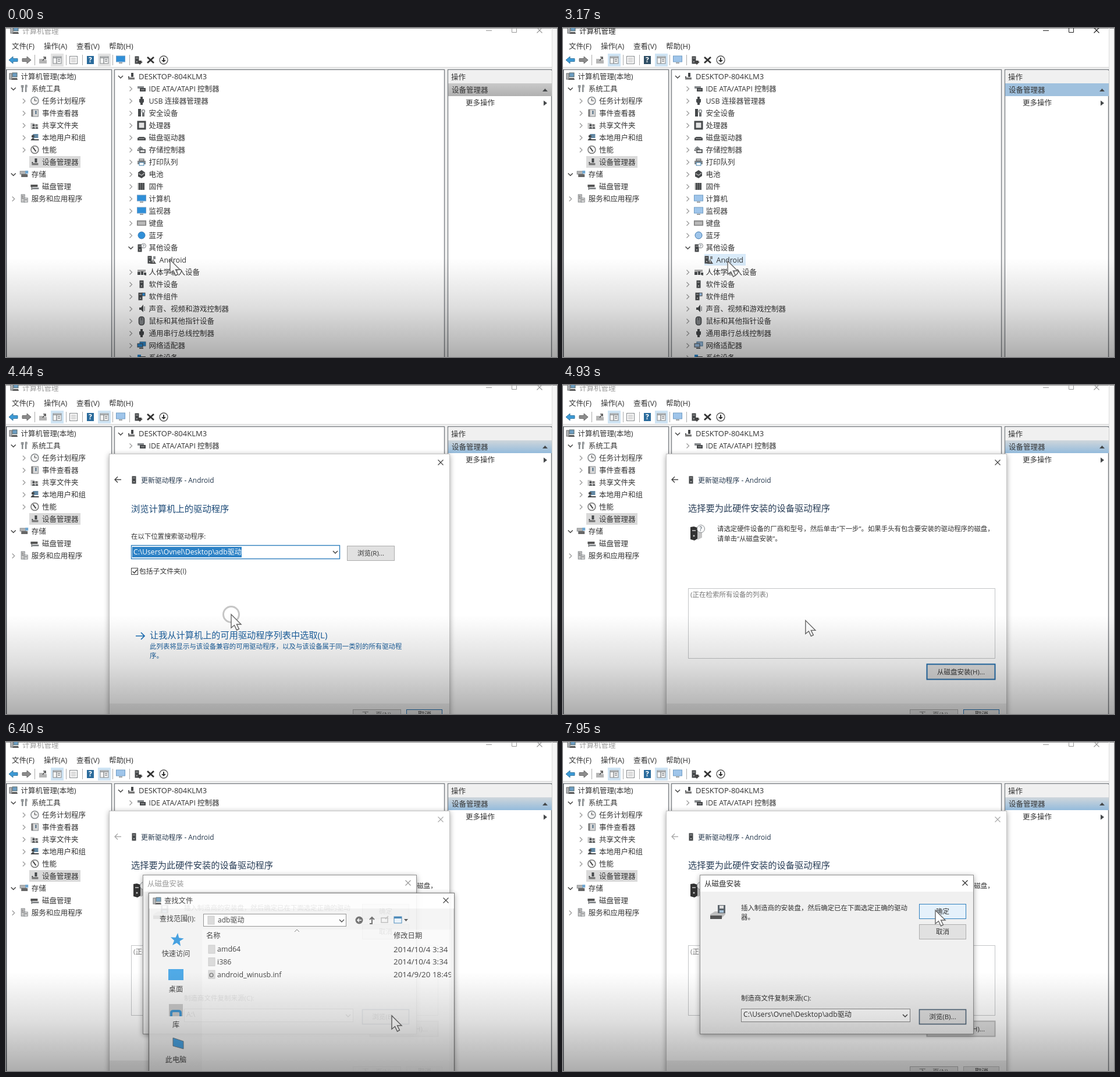
An HTML page that plays this animation: 947x565 px, repeating every 8000 ms.

```html
<!DOCTYPE html>
<html lang="zh-CN">
<head>
<meta charset="utf-8">
<title>设备管理器</title>
<style>
html, body { margin: 0; width: 100%; height: 100%; overflow: hidden; background: #fff; }
svg { display: block; width: 947px; height: 565px; }
text { font-family: "Open Sans", "Noto Sans CJK SC", "Noto Sans CJK", sans-serif; white-space: pre; }
.dialog { filter: drop-shadow(0 2px 5px rgba(0, 0, 0, .35)); }
</style>
</head>
<body>
<svg id="stage" viewBox="0 0 947 565" xmlns="http://www.w3.org/2000/svg"></svg>
<script>
const LOOP = 8000;
const INK = '#333', DARK = '#46494b', MID = '#85898c', BLUE = '#2f8fd8';
const PATH = 'C:\\Users\\Ovnel\\Desktop\\adb驱动';
const stage = document.getElementById('stage');

// Shape helpers; text is placed by its vertical centre.
const text = (x, y, s, size = 12.5, fill = INK, more = '') =>
  `<text x="${x}" y="${y + size * .36}" font-size="${size}" fill="${fill}" ${more}>${s}</text>`;
const rect = (x, y, w, h, fill, stroke = 'none', sw = 1, more = '') =>
  `<rect x="${x}" y="${y}" width="${w}" height="${h}" fill="${fill}" stroke="${stroke}" stroke-width="${sw}" ${more}/>`;
const fillPath = (d, fill = DARK) => `<path d="${d}" fill="${fill}"/>`;
const line = (d, stroke = DARK, sw = 1.2) => `<path d="${d}" fill="none" stroke="${stroke}" stroke-width="${sw}"/>`;
const disc = (x, y, r, fill, stroke = 'none', sw = 1) =>
  `<circle cx="${x}" cy="${y}" r="${r}" fill="${fill}" stroke="${stroke}" stroke-width="${sw}"/>`;
const at = (x, y, body) => `<g transform="translate(${x} ${y})">${body}</g>`;
const group = (id, body, cls = '') => `<g id="${id}" class="${cls}">${body}</g>`;
const cross = (x, y, stroke, r = 4.5) => line(`M${x - r} ${y - r}l${2 * r} ${2 * r}m0 ${-2 * r}l${-2 * r} ${2 * r}`, stroke, 1.2);
const chevron = (x, y, open) => open
  ? line(`M${x - 4} ${y - 2}l4 4 4-4`, '#444', 1.5)
  : line(`M${x - 2} ${y - 4}l4 4-4 4`, '#9a9a9a', 1.3);
const button = (x, y, w, h, label, edge = '#adadad', sw = 1, fill = '#e1e1e1', ink = INK) =>
  rect(x + .5, y + .5, w - 1, h - 1, fill, edge, sw) +
  text(x + w / 2, y + h / 2, label, 11.5, ink, 'text-anchor="middle"');

const tower = rect(-3.5, -6.5, 7, 13, DARK) + rect(-2, -4, 4, 1.2, '#aaa') + disc(0, 3, 1.1, '#ccc');
const screen = rect(-7.5, -6, 15, 10, 'var(--screen)', '#6f9bc4') + line('M-3 6h6', MID, 1.6);
const machine = rect(-2, -6, 8, 7, '#6c9dc2', '#566') + rect(-7, -5, 4, 10, '#b5b9bc', '#666') + fillPath('M-2 3h8l1 3h-11z', '#555');
const icons = {
  machine, tower, screen,
  ide: rect(-7, -4, 11, 4, MID) + rect(-3, -1, 10, 6, DARK) + line('M-1 2h6', '#aaa'),
  usb: fillPath('M-2-7h4v4h2v5l-2 2v3h-4v-3l-2-2v-5h2z'),
  lock: rect(-6, -7, 5, 13, DARK) + line('M2 6v-7m2 7v-7', DARK, 1.6) + disc(3, -3, 2.4, 'none', MID, 1.5),
  cpu: rect(-6, -6, 12, 12, '#e2e2e2', DARK, 3),
  disk: fillPath('M-7 1l3-2h8l3 2v4h-14z') + line('M-5 2h10', '#aaa'),
  store: fillPath('M-7-2l5-4 5 4-5 4z', MID) + rect(-3, 0, 9, 5, '#ddd', DARK, 1.6) + line('M-5 2l-2-2', DARK, 2),
  printer: rect(-7, -2, 14, 6, MID) + rect(-4, -5, 8, 3, '#ddd', DARK) + rect(-4, 1, 8, 5, '#fff', '#3a7cab'),
  battery: fillPath('M-6-3l6-4 6 4v6l-6 4-6-3z') + line('M-5-1l5 3 5-4', '#bbb', 1.4),
  firmware: rect(-5, -6, 10, 12, DARK) + line('M-6-6v12m4-12v12m4-12v12', '#8a8a8a', 1),
  keyboard: rect(-7.5, -4, 15, 8, '#9b9b9b', '#777') + line('M-6-1h12m-12 2.5h12', '#e4e4e4'),
  wireless: disc(0, 0, 6, 'var(--screen)', '#3d79b0'),
  unknown: at(-3, 1, tower) + disc(3.5, -3, 4, '#f4f4f4', MID) + text(1.8, -3, '?', 7, '#345'),
  warn: at(-4, 0, tower) + fillPath('M2-6h4v5h-4z', MID) + fillPath('M2-1l5 8h-10z', '#555') + line('M2 1v4', '#fff', 1),
  hid: rect(-7, -4, 14, 4, '#aaa') + fillPath('M-7 5v-5h5v5zM-1 5v-6h4v6zM4 5v-4h4v5z'),
  component: at(-2, 0, tower) + rect(1, -6, 5, 5, 'var(--screen)', DARK),
  sound: fillPath('M-4-2h3l4-5v13l-4-4h-3z') + line('M5-4v8', MID, 1.4),
  mouse: rect(-4.5, -7, 9, 14, MID, DARK, 1.6, 'rx="4"') + line('M0-6v5', DARK),
  net: rect(-3, -6, 10, 7, 'var(--screen)', '#4b7899') + rect(-7, -3, 9, 6, 'var(--screen)', DARK) + line('M-4 5h7', DARK, 1.6),
  system: rect(-7, -5, 6, 4, BLUE) + rect(-4, -2, 11, 6, DARK),
  tools: line('M-3-6v12m6-12v12', MID, 2.4) + line('M-5-6v4h4v-4m3 0h3v4', MID, 1),
  clock: disc(0, 0, 6.5, '#f4f4f4', MID, 1.5) + line('M0-4v4h4', '#555'),
  log: rect(-5, -6, 11, 12, '#d9d9d9', MID) + rect(-6, -6, 3, 12, '#777') + line('M2-4v6', '#4a6880', 2),
  shared: fillPath('M-7-4h6l1 2h6v8h-13z', '#c8c8c8') + disc(-2, 0, 2, DARK) + disc(3, 0, 2, '#777') + fillPath('M-5 6q3-6 6 0zM1 6q3-6 5 0z'),
  users: rect(-3, -6, 9, 7, '#6288a4') + disc(-3, -2, 2.5, DARK) + fillPath('M-7 5q4-8 8 0z') + line('M0 4h7', DARK, 2),
  gauge: disc(0, 0, 6.5, '#f4f4f4', '#777', 1.5) + line('M-3-4l5 7', '#444', 2),
  devices: rect(0, -6, 4, 7, DARK) + rect(-5, 2, 11, 3.5, '#777') + line('M-4 0v2', DARK, 2),
  storage: rect(-7, -5, 10, 5, '#b5b5b5', MID) + rect(-5, 0, 11, 5, '#666') + rect(2, -6, 5, 5, '#71a8d2'),
  drives: rect(-7, -3, 12, 4, '#555') + rect(-4, 2, 11, 3, MID) + line('M-5 0v6', DARK),
  services: rect(-5, -7, 6, 13, '#c9c9c9', MID) + rect(0, -1, 6, 7, '#ddd', MID) + line('M-4-4h3m-3 3h3m2 3h4', '#555'),
};
const icon = (name, x, y) => at(x, y, icons[name]);
// state: 0 leaf, 1 closed, 2 open
const row = (x, y, name, label, state) =>
  (state ? chevron(x - 18.5, y + .5, state === 2) : '') + icon(name, x, y) + text(x + 12.5, y, label);

const devices = [
  ['ide', 'IDE ATA/ATAPI 控制器'], ['usb', 'USB 连接器管理器'], ['lock', '安全设备'], ['cpu', '处理器'],
  ['disk', '磁盘驱动器'], ['store', '存储控制器'], ['printer', '打印队列'], ['battery', '电池'],
  ['firmware', '固件'], ['screen', '计算机'], ['screen', '监视器'], ['keyboard', '键盘'],
  ['wireless', '蓝牙'], ['unknown', '其他设备', 2], ['warn', 'Android', 0], ['hid', '人体学输入设备'],
  ['tower', '软件设备'], ['component', '软件组件'], ['sound', '声音、视频和游戏控制器'],
  ['mouse', '鼠标和其他指针设备'], ['usb', '通用串行总线控制器'], ['net', '网络适配器'], ['system', '系统设备'],
];
// [depth, icon, label, state]
const places = [
  [0, 'machine', '计算机管理(本地)', 0], [1, 'tools', '系统工具', 2], [2, 'clock', '任务计划程序', 1],
  [2, 'log', '事件查看器', 1], [2, 'shared', '共享文件夹', 1], [2, 'users', '本地用户和组', 1],
  [2, 'gauge', '性能', 1], [2, 'devices', '设备管理器', 0], [1, 'storage', '存储', 2],
  [2, 'drives', '磁盘管理', 0], [1, 'services', '服务和应用程序', 1],
];

function toolbar() {
  const arrow = 'M-8 0l7-6v3.5h8v5h-8v3.5z';
  const sheet = rect(-7, -6, 14, 12, '#f5f5f5', MID) + line('M-7-4h14m-8 0v10M1-1h4m-4 3h4', MID, 1.4);
  return at(13, 55, `<path d="${arrow}" fill="#3d9ad6" stroke="#34779f"/>`) +
    at(35, 55, `<path d="${arrow}" fill="#8d8d8d" stroke="#666" transform="scale(-1 1)"/>`) +
    [49, 103, 131, 183, 212].map(x => line(`M${x}.5 46v18`, '#aaa', 1)).join('') +
    [77, 158].map(x => rect(x, 44, 22, 22, 'var(--tool)')).join('') +
    at(64, 55, fillPath('M-7-2h6l1 2h6v6h-13z', '#b5b5b5') + line('M-1 1l5-6m-4 0h4v4', '#555', 1.6)) +
    at(88, 55, sheet) + at(169, 55, sheet) +
    at(116, 55, rect(-6.5, -6.5, 13, 13, '#f8f8f8', MID) + line('M-4-3h8m-8 3h8m-8 3h8', '#aaa')) +
    at(145, 55, rect(-6, -7, 12, 14, 'var(--help)') + text(-3, 0, '?', 12, '#fff', 'font-weight="700"')) +
    at(197, 54, screen) +
    at(227, 55, at(-2, 0, tower) + fillPath('M0 1h6v2h2l-5 5-5-5h2z', '#444')) +
    line('M243 50l11 10m0-10l-11 10', '#333', 2.8) +
    disc(271, 55, 7, '#fff', '#555', 1.3) + fillPath('M270 51h2v4h3l-4 4-4-4h3z', '#333');
}

function mainWindow() {
  const frame = (x, w) => rect(x + .5, 71.5, w, 510, '#fff', '#777c81', 1.3);
  return rect(0, 0, 947, 565, '#fff') + rect(938, 0, 9, 565, '#f5f5f5') + rect(0, 67, 938, 498, '#f0f0f0') +
    line('M0 .5h947', '#8a8a8a', 1) + line('M0 67.5h938', '#d5d5d5', 1) + line('M938.5 0v565', '#ddd', 1) +
    icon('machine', 15, 4) + text(28, 5, '计算机管理', 12.5, 'var(--title)') +
    line('M825 4.5h10M869.5 -.5h8v8h-8z', 'var(--title)', 1) + cross(917, 4, 'var(--title)') +
    ['文件(F)', '操作(A)', '查看(V)', '帮助(H)'].map((s, i) => text([10, 65, 121, 177][i], 31, s)).join('') +
    toolbar() + frame(0, 181) + frame(186, 567) + frame(759, 178) +
    line('M.5 72v493', '#454a50', 1.5) +
    rect(40, 220, 88, 20, '#d9d9d9') +
    places.map(([d, name, label, state], i) => row(13 + 18.2 * d, 83 + 21 * i, name, label, state)).join('') +
    group('hover', rect(243, 388, 71, 20, '#d8eaf9')) +
    chevron(197, 84, true) + icon('devices', 215, 83) + text(228, 83, 'DESKTOP-804KLM3', 13) +
    devices.map(([name, label, state = 1], i) => row(state ? 233 : 251, 104 + 21 * i, name, label, state)).join('') +
    rect(760, 73, 178, 22, '#f0f0f0') + text(765, 84.5, '操作') +
    rect(760, 95, 178, 22, 'var(--bar)') + text(766, 106, '设备管理器') +
    fillPath('M922 109l4.5-5 4.5 5z') + text(790, 128.5, '更多操作') + fillPath('M924 124.5l6 4.5-6 4.5z');
}

function wizard() {
  const browse = text(215, 212, '浏览计算机上的驱动程序', 15.3, '#1d4b78') +
    text(215, 260, '在以下位置搜索驱动程序:', 11.4) +
    rect(215.5, 275.5, 358, 23, '#fff', '#2f7fbd', 1.4) + rect(217, 278, 188, 18, '#2d82c6') +
    text(219, 287, PATH, 12.1, '#fff') + chevron(566, 287, true) +
    button(586, 276, 82, 26, '浏览(R)...') +
    rect(215.5, 314.5, 11, 11, '#fff', '#444') + line('M217.5 320l3 3 5-6', '#333', 1.4) +
    text(229, 320, '包括子文件夹(I)', 11.8) +
    line('M223 431h15m-6-6l6 6-6 6', '#1c70b8', 1.7) +
    text(247, 430, '让我从计算机上的可用驱动程序列表中选取(L)', 15.2, '#1b609f') +
    text(247, 449, '此列表将显示与该设备兼容的可用驱动程序，以及与该设备属于同一类别的所有驱动程', 11.42, '#1b609f') +
    text(247, 465, '序。', 11.42, '#1b609f');
  const choose = text(215, 212, '选择要为此硬件安装的设备驱动程序', 15.25, '#2a3f58') +
    at(231, 253, fillPath('M-12-9l6-1 6 2v19l-5 3-7-2z', '#333') + fillPath('M0-8l8 2v15l-8 4z', '#c4c4c4') +
      rect(-9, -4, 6, 2, '#aaa') + disc(-6, 6, 1.5, '#ccc') +
      disc(6, -6, 6.5, '#fafafa', MID) + text(3.5, -6, '?', 10, '#345')) +
    text(265, 247, '请选定硬件设备的厂商和型号，然后单击“下一步”。如果手头有包含要安装的驱动程序的磁盘，', 11.42) +
    text(265, 263.5, '请单击“从磁盘安装”。', 11.42) +
    rect(215.5, 349.5, 527, 120, '#fff', '#c3c5c7') + text(219, 360, '(正在检索所有设备的列表)', 11.5, '#777') +
    button(625, 479, 118, 27, '从磁盘安装(H)...', 'var(--edge)', 2);
  return rect(177.5, 118.5, 585, 470, '#fff', '#c4c4c4') + rect(178, 547, 584, 20, '#f0f0f0') +
    cross(747, 133, 'var(--wizard)') + line('M198 162.5h-11m5-5l-5 5 5 5', 'var(--wizard)', 1.4) +
    at(220, 163, tower) + text(232, 163.5, '更新驱动程序 - Android', 11.9, '#25384d') +
    group('browse', browse) + group('choose', choose) +
    button(596, 557, 83, 26, '') + text(612, 566, '下一页(N)', 11.5, '#777') +
    button(688, 557, 62, 26, '', 'var(--edge)') + text(708, 566, '取消', 11.5);
}

function diskDialog() {
  return rect(235.5, 228.5, 470, 273, '#f0f0f0', '#8f8f8f') + rect(236, 229, 469, 28, '#fff') +
    text(243, 243, '从磁盘安装', 12.5, 'var(--disk)') + cross(691, 242, 'var(--disk)') +
    at(266, 292, fillPath('M-13 4l8-5h18v5l-6 6h-20z', '#bdbdbd') + fillPath('M-13 6h20v6h-20z', '#555') +
      rect(0, -12, 13, 14, '#5d666d') + rect(3, -11, 7, 5, '#ddd') + rect(3, -3, 7, 4, '#a9c4da')) +
    text(306, 285, '插入制造商的安装盘，然后确定已在下面选定正确的驱动', 11.45) + text(306, 301, '器。', 11.45) +
    button(612, 278, 81, 26, '确定', 'var(--ok)', 1, 'var(--okFill)') + button(612, 313, 81, 26, '取消') +
    text(306, 440, '制造商文件复制来源(C):', 11.5) +
    rect(306.5, 458.5, 290, 22, '#fff', '#8a8a8a') + chevron(588, 470, true) +
    group('drive', text(310, 468, 'A:\\', 12.1)) + group('source', text(310, 468, PATH, 12.1)) +
    button(612, 459, 81, 26, '浏览(B)...', '#50667a', 1.6);
}

function picker() {
  const folder = (x, y) => rect(x - 5, y - 7, 11, 14, '#d9d9d9', '#c8c8c8');
  const star = Array.from({ length: 10 }, (_, i) => {
    const r = i % 2 ? 5 : 12, a = i * Math.PI / 5 - Math.PI / 2 + .1;
    return `${(294 + r * Math.cos(a)).toFixed(1)} ${(340 + r * Math.sin(a)).toFixed(1)}`;
  }).join('L');
  const files = [['amd64', '2014/10/4 3:34'], ['i386', '2014/10/4 3:34'], ['android_winusb.inf', '2014/9/20 18:49']];
  return '<clipPath id="list"><rect x="337" y="322" width="428" height="250"/></clipPath>' +
    rect(245.5, 259.5, 525, 330, '#f4f4f4', '#777', 1.4) + rect(246, 260, 524, 26, '#fff') +
    icon('machine', 260, 273) + text(272, 273, '查找文件', 12.3) + cross(756, 272, '#333') +
    text(264, 304, '查找范围(I):', 12) +
    rect(339.5, 295.5, 245, 21, '#fff', '#8a8a8a') + folder(352, 306) + text(364, 306, 'adb驱动', 12) + chevron(577, 307, true) +
    disc(607, 306, 6.5, '#666') + line('M611 306h-7m3-3l-3 3 3 3', '#fff', 1.4) +
    line('M625 312h4v-11m-4 4l4-4 4 4', '#666', 2) + line('M645 302h11v8h-11zm7 2l5-5', '#bbb', 1.5) +
    rect(667, 300, 13, 11, '#eaf4fc', '#3b80b5') + rect(667, 300, 13, 3, '#3b80b5') + fillPath('M684 304h7l-3.5 4z') +
    rect(337, 322, 428, 250, '#fafafa') + line('M496 326l4-4 4 4', '#777', 1) +
    `<g clip-path="url(#list)">` + text(344, 333, '名称', 12.3) + text(666, 333, '修改日期', 12.3) +
    files.map(([name, date], i) => {
      const y = 356 + 21.6 * i;
      return folder(353, y) + (i === 2 ? disc(353, y + 1, 3, 'none', '#777', 1.6) : '') +
        text(363, y, name, 12.4) + text(666, y, date, 13.4);
    }).join('') + '</g>' +
    fillPath(`M${star}z`, '#3398df') + rect(279, 390, 26, 19, '#3da2e6') +
    rect(280, 450, 24, 21, '#c4c4c4') + line('M284 471v-6q0-3 4-3h8q4 0 4 3v6', '#2f8ccb', 4) +
    fillPath('M287 508l18 6v13l-18-5z', '#3398df') + line('M287 508l18 6v13l-18-5z', '#65727c', 1) +
    ['快速访问', '桌面', '库', '此电脑'].map((s, i) => text(292, 364 + 60.6 * i, s, 12.2, INK, 'text-anchor="middle"')).join('');
}

const shade = (id, stops) => `<linearGradient id="${id}" x2="0" y2="1">` +
  stops.map((s, i) => `<stop offset="${i / (stops.length - 1)}" ${s}/>`).join('') + '</linearGradient>';

stage.innerHTML = '<defs>' +
  shade('idle', ['stop-color="#c9c9c9"', 'stop-color="#b0b0b0"']) +
  shade('mixed', ['stop-color="#cfd6db"', 'stop-color="#94bbdc"']) +
  shade('dusk', ['stop-opacity="0"', 'stop-opacity=".13"', 'stop-opacity=".32"']) + '</defs>' +
  mainWindow() + group('wizard', wizard(), 'dialog') + group('disk', diskDialog(), 'dialog') +
  group('picker', picker(), 'dialog') +
  group('ring', disc(387, 394, 13.5, 'none', '#c6c6c6', 3)) +
  group('cursor', '<path d="M0 0V23L5.5 18.5 9.5 27 13.5 25 9.5 17H17Z" fill="#fff" stroke="#666" stroke-width="1.4"/>') +
  rect(0, 395, 947, 170, 'url(#dusk)');

// [time, x, y]
const track = [
  [0, 282, 398], [130, 282, 398], [760, 304, 401], [970, 304, 401], [1650, 283, 400], [3240, 283, 400],
  [4300, 387, 394], [4790, 387, 394], [5490, 670, 492], [5770, 670, 492], [6330, 663, 470], [6540, 663, 470],
  [6960, 400, 399], [7310, 400, 399], [7800, 640, 289], [LOOP, 640, 289],
];
function pointer(t) {
  const i = track.findIndex(k => k[0] > t);
  const [t0, x0, y0] = track[i - 1], [t1, x1, y1] = track[i];
  const p = (t - t0) / (t1 - t0), e = p * p * (3 - 2 * p);
  return [x0 + (x1 - x0) * e, y0 + (y1 - y0) * e];
}

const el = id => document.getElementById(id);
const show = (id, on) => { el(id).style.display = on ? '' : 'none'; };
const paint = (name, value) => stage.style.setProperty('--' + name, value);

function draw(t) {
  const started = t >= 200, wizardOpen = t >= 3400, diskOpen = t >= 5840;
  const pickerOpen = t >= 6300 && t < 7380, overOk = t >= 7700;
  show('hover', started);
  show('wizard', wizardOpen);
  show('browse', t < 4930);
  show('choose', t >= 4930);
  show('disk', diskOpen);
  show('drive', t < 7380);
  show('source', t >= 7380);
  show('picker', pickerOpen);
  show('ring', t >= 4370 && t < 4580);
  el('picker').style.opacity = Math.min(1, .6 + (t - 6300) / 350);

  const active = started && !wizardOpen;
  paint('title', active ? '#222' : '#999');
  paint('screen', started ? '#9fc5ea' : BLUE);
  paint('help', active ? '#2f4f66' : '#2a6b9c');
  paint('tool', started ? '#cfe4f4' : '#e3e3e3');
  paint('bar', !started ? 'url(#idle)' : wizardOpen ? 'url(#mixed)' : '#a0c1de');
  paint('wizard', diskOpen ? '#aaa' : '#444');
  paint('edge', diskOpen ? '#bbb' : '#2470b0');
  paint('disk', pickerOpen ? '#999' : '#2b2b2b');
  paint('ok', overOk ? '#2f7fbd' : '#adadad');
  paint('okFill', overOk ? '#e5f1fb' : '#e1e1e1');

  const [x, y] = pointer(t);
  el('cursor').setAttribute('transform', `translate(${x} ${y})`);
}

function tick() {
  draw(performance.now() % LOOP);
  requestAnimationFrame(tick);
}
tick();
</script>
</body>
</html>
```
